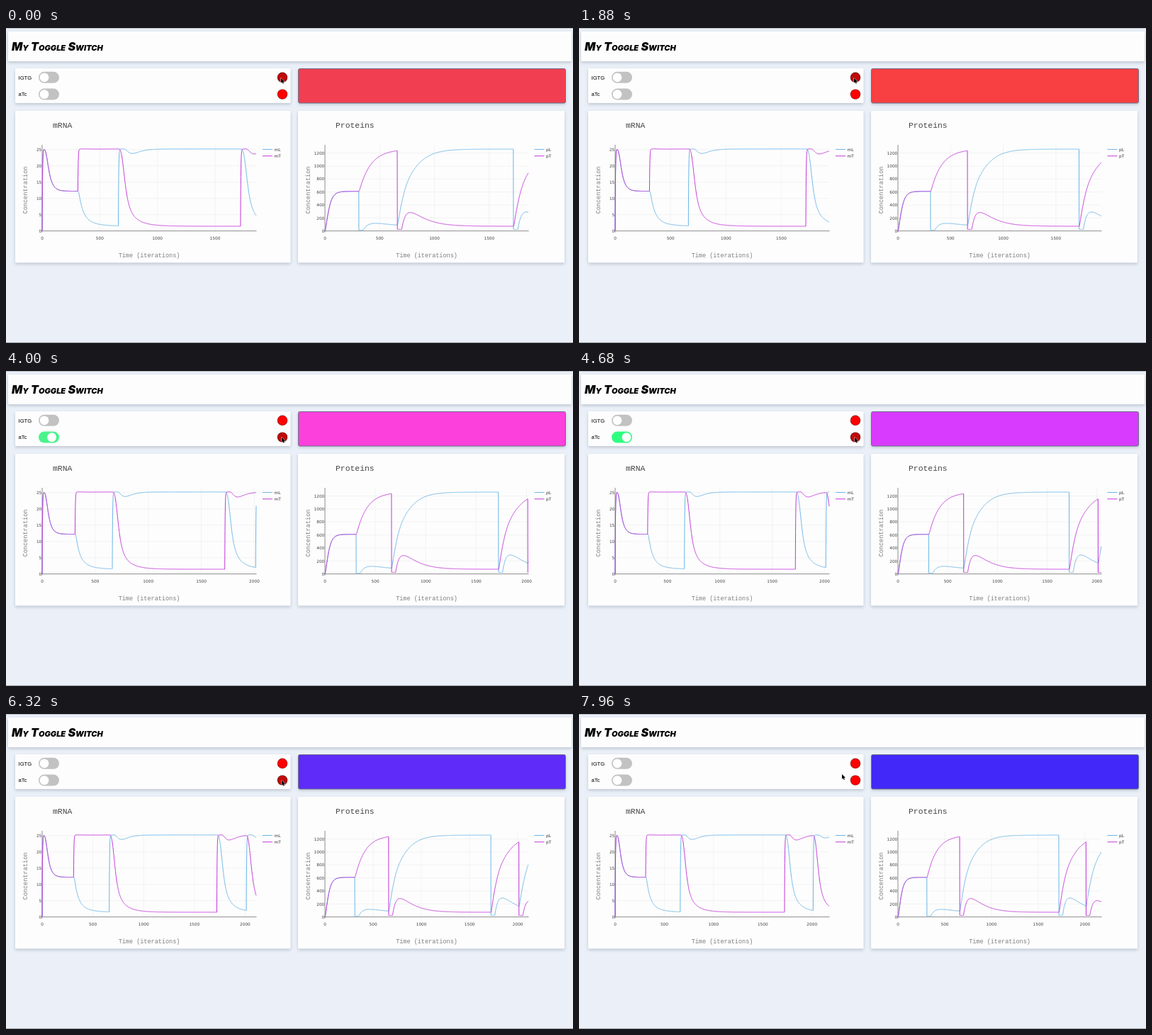
Recreate the animation shown at these times as an HTML page with a canvas. Size 800 px wide and 445 px high, loop 8 s.

```html
<!DOCTYPE html>
<html lang="en">
<head>
<meta charset="utf-8">
<title>Toggle switch simulation</title>
<style>
html, body { margin: 0; width: 100%; height: 100%; overflow: hidden; background: #ebf0f8; }
canvas { display: block; width: 800px; height: 445px; }
</style>
</head>
<body>
<canvas id="stage"></canvas>
<script>
const W = 800, H = 445, LOOP = 8000;
const START = 1858, RATE = 0.04;               // samples on show at t = 0, samples per ms
const PULSES = [[310, 'pL'], [661, 'pT'], [1721, 'pL'], [2012, 'pT']], HOLD = 40;
const BLUE = '#6bb6e8', MAGENTA = '#c236d8';
const MONO = '"Liberation Mono", monospace', SANS = '"DejaVu Sans", sans-serif';

const canvas = document.getElementById('stage');
const ctx = canvas.getContext('2d');
const dpr = window.devicePixelRatio || 1;
canvas.width = W * dpr;
canvas.height = H * dpr;

const clamp = v => Math.max(0, Math.min(1, v));
const ease = v => 1 - (1 - clamp(v)) ** 2.4;
const smooth = v => { v = clamp(v); return v * v * (3 - 2 * v); };

// Two genes repress each other; a pulse cuts one protein and holds it low.
function simulate(count) {
  const out = { mL: [], mT: [], pL: [], pT: [] };
  const s = { mL: 0, mT: 0, pL: 0, pT: 0 };
  const made = repressor => 25.2 / (1 + (repressor / 600) ** 3.77);
  for (let i = 0; i < count; i++) {
    let held = null;
    for (const [at, name] of PULSES) {
      if (i === at) s[name] /= 50;
      if (i >= at && i < at + HOLD) held = name;
    }
    for (const key in s) out[key].push(s[key]);
    const { mL, mT, pL, pT } = s;
    s.mL += (made(pT) - mL) / 3.5;
    s.mT += (made(pL) - mT) / 3.5;
    if (held !== 'pL') s.pL += (50 * mL - pL) / 105;
    if (held !== 'pT') s.pT += (50 * mT - pT) / 105;
  }
  return out;
}
const data = simulate(START + LOOP * RATE + 2);

const charts = [
  { title: 'mRNA', x: 13, w: 388.5, left: 51, right: 353, legend: 362, scale: 4.6,
    step: 5, top: 25, series: ['mL', 'mT'] },
  { title: 'Proteins', x: 412, w: 376, left: 450, right: 737, legend: 745.5, scale: 0.0918,
    step: 200, top: 1200, series: ['pL', 'pT'] }
];
const BASE = 286.7, CEIL = 165;

function text(str, x, y, font, color, align = 'left') {
  ctx.font = font;
  ctx.fillStyle = color;
  ctx.textAlign = align;
  ctx.fillText(str, x, y);
}

function line(x1, y1, x2, y2, color, width = 1) {
  ctx.strokeStyle = color;
  ctx.lineWidth = width;
  ctx.beginPath();
  ctx.moveTo(x1, y1);
  ctx.lineTo(x2, y2);
  ctx.stroke();
}

function roundBox(x, y, w, h, r, fill) {
  ctx.fillStyle = fill;
  ctx.beginPath();
  ctx.roundRect(x, y, w, h, r);
  ctx.fill();
}

function card(x, y, w, h) {
  ctx.save();
  ctx.shadowColor = 'rgba(70, 85, 110, 0.28)';
  ctx.shadowBlur = 4 * dpr;
  ctx.shadowOffsetY = 2 * dpr;
  roundBox(x, y, w, h, 1, '#fdfdfd');
  ctx.restore();
}

function disc(x, y, r, fill) {
  ctx.fillStyle = fill;
  ctx.beginPath();
  ctx.arc(x, y, r, 0, 2 * Math.PI);
  ctx.fill();
}

function control(label, y, on, cursor) {
  text(label, 17.5, y + 2.8, '7.7px "Liberation Sans", sans-serif', '#000');
  const mix = (a, b) => a + (b - a) * on;
  roundBox(46, y - 8, 29, 16, 8, `rgb(${mix(194, 46)}, ${mix(194, 255)}, ${mix(194, 128)})`);
  disc(54 + 13 * on, y, 6.4, '#fff');
  const hover = Math.hypot(cursor.x - 390, cursor.y - y) < 7;
  disc(390, y, 7.2, hover ? '#5e1010' : '#8c1010');
  disc(390, y, 6.5, hover ? '#c20808' : '#ff0000');
}

function drawChart(c, count) {
  card(c.x, 117, c.w, 214.5);
  text(c.title, c.left + 15, 141, '11.4px ' + MONO, '#444');
  const px = i => c.left + i / (count - 1) * (c.right - c.left);
  const py = v => BASE - v * c.scale;

  for (let i = 0; i < count; i += 500) {
    if (i) line(px(i), CEIL, px(i), BASE, '#eeeff1', 0.7);
    text(i, px(i), 299.3, '5.8px ' + SANS, '#444', 'center');
  }
  for (let v = 0; v <= c.top; v += c.step) {
    if (v) line(c.left, py(v), c.right, py(v), '#eeeff1', 0.7);
    text(v, c.left - 0.7, py(v) + 2.2, '5.8px ' + SANS, '#444', 'right');
  }
  line(c.left, CEIL, c.left, BASE + 2, '#8c8c8c');
  line(c.left - 2, BASE, c.right + 0.5, BASE, '#8c8c8c');

  c.series.forEach((name, k) => {
    const color = k ? MAGENTA : BLUE;
    ctx.strokeStyle = color;
    ctx.lineWidth = 1;
    ctx.lineJoin = 'round';
    ctx.beginPath();
    for (let i = 0; i < count; i++) ctx.lineTo(px(i), py(data[name][i]));
    ctx.stroke();
    const y = 171.5 + 9.3 * k;
    line(c.legend, y, c.legend + 14, y, color);
    text(name, c.legend + 16.5, y + 2, '5.9px ' + SANS, '#333');
  });

  text('Time (iterations)', (c.left + c.right) / 2, 324, '8.5px ' + MONO, '#7f7f7f', 'center');
  ctx.save();
  ctx.translate(c.left - 21.5, 229);
  ctx.rotate(-Math.PI / 2);
  text('Concentration', 0, 0, '8.6px ' + MONO, '#7f7f7f', 'center');
  ctx.restore();
}

function drawCursor({ x, y }) {
  ctx.save();
  ctx.translate(x, y);
  ctx.beginPath();
  [[0, 0], [0, 7], [1.6, 5.6], [2.7, 8], [3.9, 7.4], [2.9, 5.2], [5, 5]]
    .forEach(p => ctx.lineTo(...p));
  ctx.closePath();
  ctx.strokeStyle = '#fff';
  ctx.lineWidth = 0.9;
  ctx.stroke();
  ctx.fillStyle = '#000';
  ctx.fill();
  ctx.restore();
}

function draw(t) {
  const count = START + Math.floor(t * RATE);
  const down = smooth((t - 3350) / 300), away = smooth((t - 7500) / 400);
  const cursor = { x: 388 + down - 18 * away, y: 70.7 + 23 * down - 8.7 * away };
  const toggled = ease((t - 3800) / 400) - ease((t - 4800) / 400);

  ctx.setTransform(dpr, 0, 0, dpr, 0, 0);
  ctx.fillStyle = '#ebf0f8';
  ctx.fillRect(0, 0, W, H);
  line(0, 0.5, W, 0.5, '#bcc1c8');
  line(0, 444.5, W, 444.5, '#9da2a9');

  card(3, 5, 795, 42);
  text('My Toggle Switch', 8, 32, 'italic small-caps 900 16px Inter, sans-serif', '#000');

  card(13, 57, 388.5, 49);
  control('IGTG', 69.8, 0, cursor);
  control('aTc', 93.6, toggled, cursor);

  // The panel mixes red and blue by the latest mRNA levels.
  const mL = data.mL[count - 1], mT = data.mT[count - 1];
  const red = Math.min(252, 38 + 8.55 * mT);
  const green = 36 + 1.12 * mT;
  const blue = Math.min(253, Math.max(65, 40 + 8.55 * mL));
  card(412.5, 57.5, 377, 48.5);
  roundBox(412.5, 57.5, 377, 48.5, 2, `rgb(${red}, ${green}, ${blue})`);
  ctx.strokeStyle = '#6a6f86';
  ctx.lineWidth = 1;
  ctx.stroke();

  charts.forEach(c => drawChart(c, count));
  drawCursor(cursor);
}

function tick() {
  draw(performance.now() % LOOP);
  requestAnimationFrame(tick);
}
tick();
</script>
</body>
</html>
```
